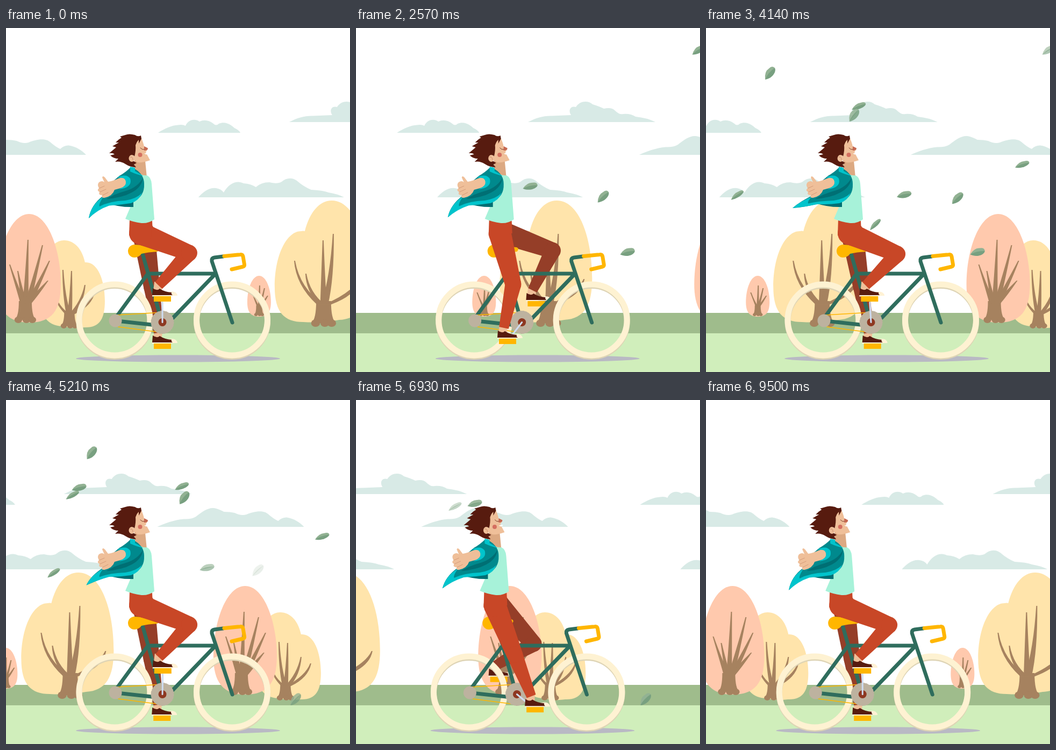
An HTML page with a canvas that plays this animation: 640 px wide and 640 px high, repeating every 9570 ms.

```html
<!DOCTYPE html>
<html lang="en">
<head>
<meta charset="utf-8">
<title>Autumn ride</title>
<style>
html, body { margin: 0; width: 100%; height: 100%; overflow: hidden; background: #fff; }
canvas { display: block; width: 640px; height: 640px; }
</style>
</head>
<body>
<canvas id="stage" width="640" height="640"></canvas>
<script>
const ctx = document.getElementById('stage').getContext('2d');
const LOOP = 9.57, RIDE = LOOP / 2;
const SKIN = '#efbf99', HAIR = '#571b0f', GREEN = '#2f6d5d', YELLOW = '#ffb600';
const TEAL = '#00898d', AQUA = '#00c4cc', DEEP = '#006f74', WOOD = '#a6825f';
const PINK = '#ffc9ad', CREAM = '#ffe4ab';

const fill = (color, d) => { ctx.fillStyle = color; ctx.fill(new Path2D(d)); };
const line = (color, width, d) => {
  ctx.strokeStyle = color; ctx.lineWidth = width;
  ctx.lineCap = ctx.lineJoin = 'round';
  ctx.stroke(new Path2D(d));
};
const oval = (color, x, y, rx, ry = rx) => {
  ctx.fillStyle = color; ctx.beginPath();
  ctx.ellipse(x, y, rx, ry, 0, 0, 7); ctx.fill();
};
const ring = (color, x, y, radius, width) => {
  ctx.strokeStyle = color; ctx.lineWidth = width;
  ctx.beginPath(); ctx.arc(x, y, radius, 0, 7); ctx.stroke();
};
const at = (x, y, draw) => { ctx.save(); ctx.translate(x, y); draw(); ctx.restore(); };
const clamp = v => Math.max(0, Math.min(1, v));
const easeSine = v => (1 - Math.cos(Math.PI * clamp(v))) / 2;
const easeCubic = v => v < .5 ? 4 * v ** 3 : 1 - 4 * (1 - v) ** 3;

// ---------- scenery ----------
const clouds = [
  'M283 195C295 187 309 181 320 180.500Q329 179 334 182C338 172 350 167 360 174Q373 168 386 178Q391 183 396 178C410 172 422 183 425 186Q434 190 436 195Z',
  'M-124 236C-112 230-92 223-75 221.500Q-60 222-52 217C-40 208-28 198-14 202Q-5 205 0 208Q12 208 20 210Q32 216 42 213C55 207 74 204 82 212Q92 221 101 225Q108 218 117 218.500C130 220 143 229 149 236Z',
  'M358 315C368 303 380 296 391 298Q400 299 405 306C414 290 429 282 442 289Q456 290 465 296Q475 287 490 287Q505 291 513 286C522 278 533 278 541 284Q555 296 568 301Q590 302 600 306Q618 309 629 315Z',
  'M527 175C542 167 556 163 571 163.500L607 162C601 153 606 144 616 147C624 134 640 135 647 142Q660 146 668 150Q682 147 688 153Q697 162 704 160Q718 159 727 165Q748 167 764 175Z'
];

const trees = [
  { color: CREAM, x: 591, y: 508, ground: 556, girth: 23, bend: .88,
    tips: [[537, 433], [558, 457], [590, 395], [609, 383], [657, 467]],
    canopy: 'M606 321C648 321 672 390 672 466C672 515 658 541 620 543Q590 549 553 547C518 547 500 529 500 482C500 421 523 378 549 378Q553 377 556 378C565 343 583 321 606 321Z' },
  { color: PINK, x: 471, y: 516, ground: 536, girth: 9, bend: .55,
    tips: [[458, 492], [472, 479], [481, 484], [487, 498]],
    canopy: 'M471 461C484 461 493 485 493 510C493 529 486 537 471 537C456 537 449 529 449 510C449 485 458 461 471 461Z' },
  { color: CREAM, x: 118, y: 528, ground: 559, girth: 16, bend: .85,
    tips: [[90, 492], [106, 450], [122, 452], [147, 478], [165, 490]],
    canopy: 'M108 395C128 395 142 412 147 436C170 434 184 468 184 508C184 540 175 558 146 557Q125 560 107 555C82 555 62 540 62 496C62 440 80 395 108 395Z' },
  { color: PINK, x: 36, y: 508, ground: 549, girth: 20, bend: .5,
    tips: [[7, 440], [22, 452], [41, 394], [68, 404], [81, 433], [78, 470]],
    canopy: 'M43 346C78 346 102 412 102 477C102 526 85 548 43 548C2 548-16 525-16 477C-16 412 8 346 43 346Z' }
];

// A flared trunk whose boughs swing out and then up to their tips
function drawTree({ color, x, y, ground, girth, bend, tips, canopy }) {
  fill(color, canopy);
  const waist = girth * .6, foot = girth * .3, w = girth * .27;
  fill(WOOD, `M${x - waist} ${y}Q${x - waist} ${ground - foot * 2} ${x - girth} ${ground - foot}L${x + girth} ${ground - foot}Q${x + waist} ${ground - foot * 2} ${x + waist} ${y}Z`);
  for (const side of [-.65, .1, .65]) oval(WOOD, x + side * girth, ground - foot, girth * .36, foot);
  for (const [tx, ty] of tips) {
    const rx = x + (tx - x) * .12, cx = x + (tx - x) * bend, cy = y + (ty - y) * .36, q = w * .6;
    fill(WOOD, `M${rx - w} ${y + w}Q${cx - q} ${cy - q / 2} ${tx - 1} ${ty}L${tx + 1} ${ty}Q${cx + q} ${cy + q} ${rx + w} ${y + w}Z`);
  }
}

function scenery(t) {
  for (const x of [-80.46 * t, 93 * (LOOP - t)])
    at(x, 0, () => clouds.forEach(d => fill('#d8eae6', d)));
  ctx.fillStyle = '#9fbc8c'; ctx.fillRect(0, 530, 640, 38);
  ctx.fillStyle = '#d0eebb'; ctx.fillRect(0, 568, 640, 72);
  for (const x of [-90.5 * t, 92.2 * (LOOP - t)])
    at(x, 0, () => trees.forEach(drawTree));
}

// Where the leaves settle, in order of appearance
const landings = [[637, 41], [505, 417], [316, 366], [468, 317], [374, 312], [90, 322],
  [163, 100], [588, 254], [337, 164], [348, 188], [184, 198], [222, 193], [538, 557]];

// Leaves right of x = 500 rest in place; the others are blown in from the left
function drawLeaves(t) {
  landings.forEach(([x, y], i) => {
    const start = .3 + .37 * i, end = 4.5 + .27 * i;
    if (t < start || t > end) return;
    const togo = (1 - (t - start) / (end - start)) ** 3;
    const away = Math.max(0, 500 - x) * .8 * togo;
    const h = 14, w = 11 + 3 * Math.sin(i * 2.3);
    at(x - away, y - away * .35, () => {
      ctx.rotate(-.5 + .35 * Math.sin(i * 1.9));
      ctx.globalAlpha = clamp(Math.min(t - start, end - t) / .6);
      fill('#92b293', `M${-h} 2Q${-h * .3} ${-w * .7} ${h * .4} ${-w * .5}Q${h} ${-w * .5} ${h} 0Z`);
      fill('#78a080', `M${-h} 2Q${-h * .2} ${-w * .2} ${h} 0C${h * .9} ${w * .5} ${-h * .2} ${w * .8} ${-h} 2Z`);
    });
  });
}

// ---------- bicycle ----------
function wheel(x) {
  ring('#ded4b5', x, 545.5, 66, 11);
  ring('#fef2d2', x, 543, 66, 11);
}

function frame() {
  line(GREEN, 7, 'M254 420L288 540M264 457H390L310 540M264 457L207 535M207 545L280 553');
  line(GREEN, 7, 'M404 425L388 427Q382 428 383 434L391 458L421 548');
  line(YELLOW, 7, 'M406 424.500L436 421.500Q440 421 441 425L443.500 440Q444 443 441 444L420 449');
  fill(YELLOW, 'M239 403Q249 403 258 406L281 408Q287 410 282 416Q264 417 252 420Q247 427 239 427A12 12 0 0 1 239 403Z');
}

function drivetrain(angle) {
  line(YELLOW, 1.6, 'M207 534L291 529M209 556L286 566');
  oval('#bdb29f', 203.5, 544.5, 12);
  at(291, 547.5, () => {
    ctx.rotate(angle);
    oval('#bdb29f', 0, 0, 20);
    ctx.setLineDash([2.5, 2.5]);
    ring('#bdb29f', 0, 0, 20, 3);
    ctx.setLineDash([]);
    oval('#8e3821', 0, 0, 7.5);
    line('#cfdcf2', 3, 'M0 0V-37');
  });
}

// ---------- rider ----------
function limb(a, b, ra, rb, color) {
  const d = Math.hypot(b.x - a.x, b.y - a.y), nx = (a.y - b.y) / d, ny = (b.x - a.x) / d;
  fill(color, `M${a.x + nx * ra} ${a.y + ny * ra}L${b.x + nx * rb} ${b.y + ny * rb}L${b.x - nx * rb} ${b.y - ny * rb}L${a.x - nx * ra} ${a.y - ny * ra}Z`);
  oval(color, a.x, a.y, ra);
}

function leg(hip, angle, color) {
  const THIGH = 98, SHIN = 83;
  const pedal = { x: 291 + 44 * Math.sin(angle), y: 548 - 44 * Math.cos(angle) };
  const ankle = { x: pedal.x - 7, y: pedal.y - 25 };
  const dx = ankle.x - hip.x, dy = ankle.y - hip.y, d = Math.hypot(dx, dy);
  const straight = d >= THIGH + SHIN;
  const along = straight ? d * THIGH / (THIGH + SHIN) : (THIGH ** 2 - SHIN ** 2 + d * d) / (2 * d);
  const out = straight ? 0 : Math.sqrt(THIGH ** 2 - along ** 2);
  const knee = { x: hip.x + (dx * along + dy * out) / d, y: hip.y + (dy * along - dx * out) / d };
  at(pedal.x, pedal.y, () => {
    fill(SKIN, 'M-15-32H0L-1-15H-17Z');
    fill('#fff2d5', 'M12-13Q26-16 28-6L-19-4.500V-7Z');
    fill(HAIR, 'M-18-20Q-10-14-5-19Q4-13 17-12Q16-9 19-7H-19Z');
    ctx.fillStyle = YELLOW; ctx.fillRect(-16, -5, 32, 10);
  });
  limb(hip, knee, 21, 15, color);
  limb(knee, ankle, 15, 9, color);
}

function head() {
  fill('#dca982', 'M239 244L259 247L262 278Q247 275 239 262Z');
  fill(SKIN, 'M236 210L251 203Q256 214 257 221L264 225L260 231L268 246Q255 251 245 250L239 246Z');
  fill('#c56851', 'M257 220L264 223.500Q264 228 257 228Z');
  fill('#fff', 'M257 233.500L265 232Q264 236 260 235Z');
  oval('#d46f60', 249.5, 236, 4);
  line('#7b3a27', 1, 'M250 223Q253 227 257 226');
  fill(HAIR, 'M252 206L251 200Q245 203 240 199Q229 196 222 199L212 202L215 204Q208 208 204 213L210 213L198 220L205 222L192 233Q199 232 202 235L194 237Q200 243 209 243L203 249Q213 247 222 253Q231 259 242 259L238 254L243 251Q233 246 230 239Q238 235 239 239Q242 228 241 218Q244 210 247 208L247 215Z');
  oval(SKIN, 234, 242.5, 5.5, 6.5);
  line('#c98c70', 1, 'M231 240Q236 239 236 245');
}

function torso(wave) {
  const tx = 146 + 8 * wave, ty = 337 + 17 * wave, lift = 5 * wave;
  fill('#a7f2d9', 'M237 264Q253 276 262 274Q270 278 271 290L276 356Q265 364 252 363Q236 361 222 355L237 320Z');
  fill(DEEP, 'M190 322Q212 320 237 320L237 333Q212 334 188 326Z');
  fill(TEAL, `M231 260L241 263Q257 273 257 290Q258 313 238 322Q210 326 188 ${328 + lift / 2}Q169 ${334 + lift} ${tx} ${ty}Q158 ${324 + lift} 181 312Q191 290 211 275Q222 269 231 260Z`);
  fill(AQUA, `M${tx} ${ty}Q158 ${324 + lift} 181 314Q172 ${323 + lift} 174 ${327 + lift}Q193 322 222 321Q242 318 253 307Q247 322 232 326Q211 329 192 ${328 + lift / 2}Q170 ${333 + lift} ${tx} ${ty}Z`);
  fill(DEEP, 'M255 278Q246 296 223 303Q201 309 187 318Q216 316 234 306Q253 296 255 278Z');
  fill(AQUA, 'M231 258L240 260L240 266L255 275Q244 273 231 267Z');
  fill(AQUA, 'M207 278Q224 270 231 280Q235 293 220 298L211 300Q223 292 218 283Q214 278 207 278Z');
  fill(SKIN, 'M209 280Q221 276 223 286Q224 294 213 298L202 301Q198 313 183 316Q176 316 179 311Q171 311 174 305Q168 302 173 298Q169 291 173 287Q179 283 183 287L179 278Q180 274 184 278L190 286Q198 285 209 280Z');
  line('#d49b79', 1, 'M174 298L183 294M175 305L186 300M180 311L190 306');
}

function rider(t) {
  const ride = t % RIDE;
  const angle = 2 * Math.PI * easeCubic(ride / RIDE);
  const wave = Math.cos(t / LOOP * 8 * Math.PI);
  const surge = 30 * (easeSine((ride - 1.4) / 2.1) - easeSine((ride - 3.55) / (RIDE - 3.55)));
  at(surge, 0, () => {
    oval('#b9b9c4', 320, 615, 190, 6.5);
    leg({ x: 256, y: 381 }, angle + Math.PI, '#953e28');
    wheel(202);
    wheel(420.5);
    frame();
    drivetrain(angle);
    fill('#c84727', 'M230 356L272 359L273 382L229 386Z');
    leg({ x: 250, y: 382 }, angle, '#c84727');
    head();
    torso(wave);
  });
}

function render(now) {
  const t = now / 1000 % LOOP;
  ctx.fillStyle = '#fff'; ctx.fillRect(0, 0, 640, 640);
  scenery(t);
  drawLeaves(t);
  rider(t);
  requestAnimationFrame(render);
}
requestAnimationFrame(render);
</script>
</body>
</html>
```
